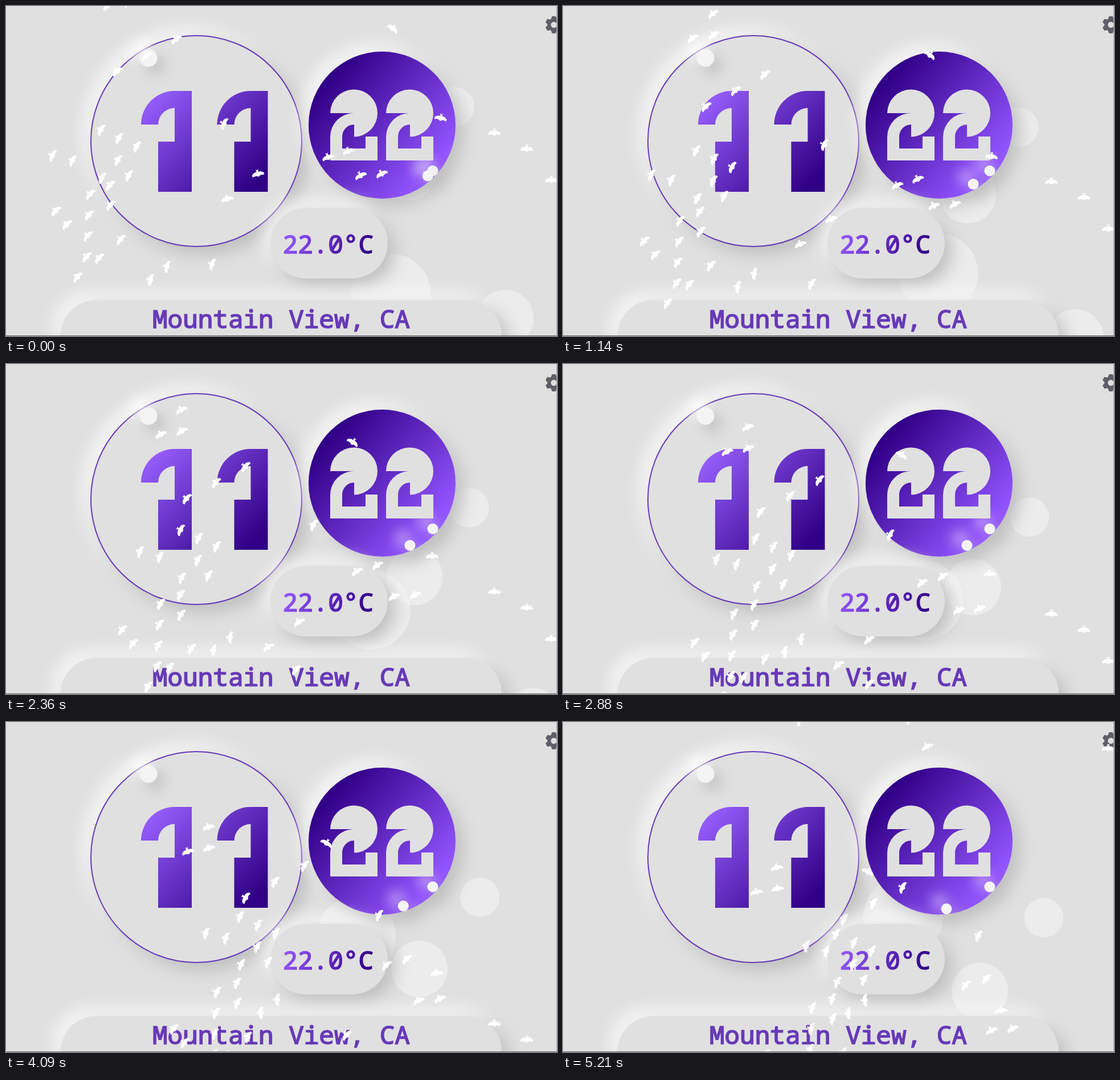
An HTML page for the animation above (5.26 s loop, 967x579 px).

```html
<!DOCTYPE html>
<html lang="en">
<head>
<meta charset="utf-8">
<title>Clock with birds</title>
<style>
  html, body { margin: 0; width: 100%; height: 100%; overflow: hidden; background: #e0e0e0; }
  #stage { position: absolute; inset: 0; width: 967px; height: 579px; overflow: hidden; }
  #stage > * { position: absolute; box-sizing: border-box; }
  .soft { background: #e0e0e0; box-shadow: 12px 12px 30px #bebebe, -12px -12px 30px rgba(255, 255, 255, .8); }
  .disc { border-radius: 50%; }
  .bubble { background: rgba(255, 255, 255, .36); }
  .ball { background: #f4f4f4; box-shadow: 12px 12px 24px #bebebe, -12px -12px 24px #fff; }
  .hours { border: 2px solid #673ab7; }
  .minutes { background: linear-gradient(130deg, #320088 17%, #9355ff 83%); }
  .pill { border-radius: 62px; }
  svg { left: 0; top: 0; }
  text { font: 500 44.3px 'Roboto Mono', 'Noto Sans Mono', 'DejaVu Sans Mono', monospace; stroke-width: 1.7px; }
</style>
</head>
<body>
<div id="stage">
  <svg id="art" width="967" height="579">
    <defs>
      <linearGradient id="hourFill" gradientUnits="userSpaceOnUse" x1="258" y1="148" x2="430" y2="318">
        <stop stop-color="#9960ff"/><stop offset="1" stop-color="#2f0085"/>
      </linearGradient>
      <linearGradient id="tempFill" gradientUnits="userSpaceOnUse" x1="492" y1="395" x2="628" y2="450">
        <stop stop-color="#9558fa"/><stop offset="1" stop-color="#320088"/>
      </linearGradient>
      <path id="two" d="M569 188A41.5 41.5 0 1 1 611 229.5V208A21 21 0 0 0 590 229V250H631V229H652V271H569V229.5A41.5 41.5 0 0 1 611 188Z"/>
    </defs>
    <g fill="url(#hourFill)">
      <path d="M237 208A59 59 0 0 1 296 149H326V326H267V238H296V179A29 29 0 0 0 267 208Z"/>
      <path d="M370.500 208A59 59 0 0 1 429.500 149H459.500V326H400.500V238H429.500V179A29 29 0 0 0 400.500 208Z"/>
    </g>
    <g fill="#e0e0e0"><use href="#two"/><use href="#two" x="98"/></g>
    <text x="485.500" y="433.500" fill="url(#tempFill)" stroke="url(#tempFill)">22.0°C</text>
    <text x="257" y="565" fill="#673ab7" stroke="#673ab7">Mountain View, CA</text>
    <g id="gear" transform="translate(961.500 33)" fill="#5f5f68">
      <circle r="8.300" fill="none" stroke="#5f5f68" stroke-width="6"/>
    </g>
    <g id="birds" fill="#fff"></g>
    <path d="M0 578.500H967" stroke="#646464"/>
    <path d="M966.500 0V579" stroke="#aaa8b4"/>
  </svg>
</div>
<script>
const LOOP = 5260;
const RAD = Math.PI / 180;
const stage = document.getElementById('stage');
const art = document.getElementById('art');

function box(cls, x, y, w, h) {
  const el = document.createElement('div');
  el.className = cls;
  el.style.cssText = `left:${x}px;top:${y}px;width:${w}px;height:${h}px`;
  stage.insertBefore(el, art);
  return el;
}
const disc = (cls, x, y, r) => box('disc ' + cls, x - r, y - r, 2 * r, 2 * r);

function path(parent, d, transform = '') {
  const el = document.createElementNS('http://www.w3.org/2000/svg', 'path');
  el.setAttribute('d', d);
  el.setAttribute('transform', transform);
  document.getElementById(parent).append(el);
  return el;
}

// Bubbles drift in straight lines, velocity in px/s
const bubble = (x, y, r, vx, vy) => ({ el: disc('bubble', x, y, r), vx, vy });
const bubbles = [
  bubble(787, 176, 34.5, 10.8, 32),
  bubble(704, 292, 49.5, 5.2, 34.4),
  bubble(676, 505, 70, -15.2, -31.2),
  bubble(876, 548, 50, 20.5, 29.8),
];

function onDial(el, cx, cy, r, degrees) {
  const a = degrees * RAD;
  el.style.transform = `translate(${cx + r * Math.sin(a)}px, ${cy - r * Math.cos(a)}px)`;
}

disc('soft hours', 334, 237, 186);
onDial(disc('ball', 0, 0, 15.5), 334, 237, 169, 330);
disc('soft minutes', 660, 209, 129);
onDial(disc('ball', 0, 0, 9.5), 660, 209, 119, 132);
const secondBall = disc('ball', 0, 0, 9.5);
box('soft pill', 464, 354, 206, 124);
box('soft pill', 96, 516, 774, 124);

for (let a = 0; a < 360; a += 60) path('gear', 'M-5 -10L-3.2 -15H3.2L5 -10Z', `rotate(${a})`);

const birdShape = 'M-7.5 -2.3L-6.3 0L-7.5 2.3L-3.2 1.3Q-3.5 8 1.5 11L4.5 10.2'
  + 'Q2.5 5 4 2.5Q7 0 4 -2.5Q2.5 -5 4.5 -10.2L1.5 -11Q-3.5 -8 -3.2 -1.3Z';
const birds = [];

// A row of evenly spaced birds
const row = (x, y, count = 1, dx = 0, dy = 0) =>
  Array.from({ length: count }, (_, i) => ({ x: x + i * dx, y: y + i * dy }));

// A flock shares heading (degrees), turn (degrees/s) and speed (px/s)
function flock(heading, turn, speed, ...rows) {
  for (const start of rows.flat()) {
    birds.push({ ...start, heading, turn, speed, el: path('birds', birdShape) });
  }
}

flock(29, -1, 67, row(166, 217, 3, 31.5, 14.5), row(196, 270, 2, 19, 27), row(168, 301));
flock(41, -4, 65, row(147, 330, 4, -2, 36.5), row(182, 314, 2, 1, 35), row(201, 409, 3, -38, 33));
flock(26, -2, 71, row(81, 262, 2, 35, 9));
flock(45, -2, 67, row(87, 359, 2, 19, 24));
flock(46, 6, 66, row(178, -1, 2, 37, -6), row(214, -44));
flock(51, -5, 73, row(298, 58, 3, -51.5, 28));
flock(15, -3, 48, row(282, 457, 2, -29, 23));
flock(20, 8, 72, row(361, 453));
flock(26, 0, 74, row(382, 206));
flock(75, -8, 74, row(442, 294, 2, -54, 44));
flock(128, -2, 51, row(679, 39));
flock(102, -5, 60, row(763, 196));
flock(70, -6, 47, row(565, 265, 2, 36, -11));
flock(62, 0, 53, row(622, 297, 2, 37, -3));
flock(90, 0, 75, row(857, 222, 2, 57, 28), row(957, 305));

// On an arc, the chord points along the mean heading
function place(bird, t) {
  const half = bird.turn * t / 2 * RAD;
  const chord = bird.speed * t * (half ? Math.sin(half) / half : 1);
  const mean = bird.heading * RAD + half;
  const x = bird.x + chord * Math.cos(mean);
  const y = bird.y + chord * Math.sin(mean);
  const wrapped = y > 620 ? y - 650 : y;
  bird.el.setAttribute('transform', `translate(${x} ${wrapped}) rotate(${bird.heading + bird.turn * t})`);
}

function draw(now) {
  const t = now % LOOP / 1000;
  for (const { el, vx, vy } of bubbles) el.style.transform = `translate(${vx * t}px, ${vy * t}px)`;
  onDial(secondBall, 660, 209, 119, 6 * (23 + Math.floor(t + 0.9)));
  for (const bird of birds) place(bird, t);
}

const start = performance.now();
function tick() {
  draw(performance.now() - start);
  requestAnimationFrame(tick);
}
tick();
</script>
</body>
</html>
```
